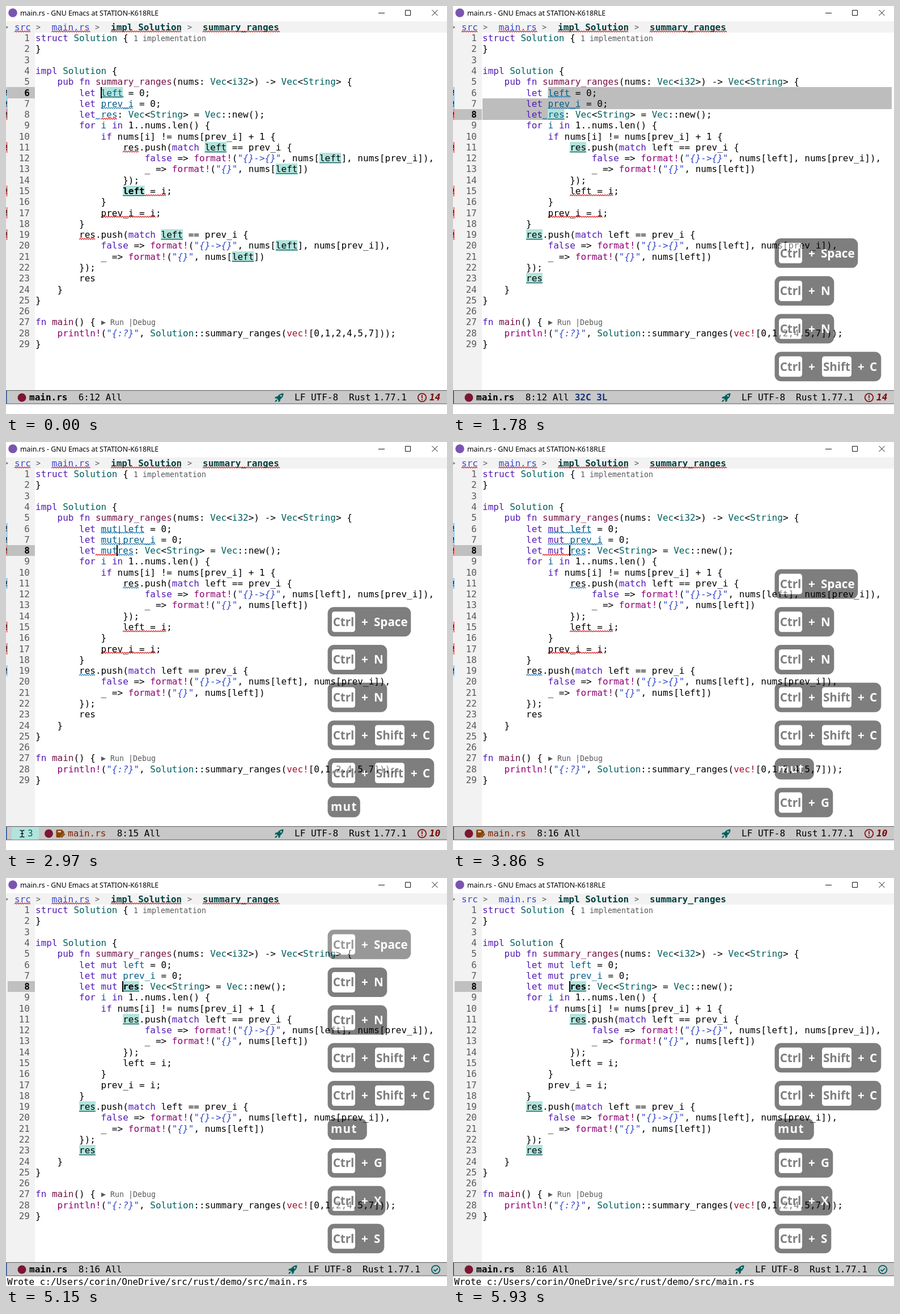
Animation, 778 px wide and 720 px high, one loop 6060 ms. Source, as an HTML page:

```html
<!DOCTYPE html>
<html lang="en">
<head>
<meta charset="utf-8">
<title>Editing with several cursors</title>
<style>
html, body { margin: 0; width: 100%; height: 100%; overflow: hidden; background: #fff; }
svg { display: block; width: 778px; height: 720px; }
text { font: 16px "DejaVu Sans Mono", monospace; white-space: pre; }
.b { font-weight: bold; }
.i { font-style: italic; }
.small { font-size: 13.3px; }
.title { font: 12.4px "Noto Sans", sans-serif; }
.cap { font: bold 20.6px "Noto Sans", sans-serif; fill: #fff; }
.dark { fill: #000; text-anchor: middle; }
.typed { letter-spacing: 1.4px; }
</style>
</head>
<body>
<svg id="stage" viewBox="0 0 778 720"></svg>
<script>
const LOOP = 6060, CW = 9.632, ROW = 19.28, TOP = 47, LEFT = 52;
const RED = '#d81e1e', BLUE = '#2a7fb8', TEAL = '#005f5f';
const NB = '\u00a0';
const stage = document.getElementById('stage');

const CODE = `struct Solution {
}

impl Solution {
    pub fn summary_ranges(nums: Vec<i32>) -> Vec<String> {
        let @left = 0;
        let @prev_i = 0;
        let #res: Vec<String> = Vec::new();
        for i in 1..nums.len() {
            if nums[i] != nums[prev_i] + 1 {
                res.push(match left == prev_i {
                    false => format!("{}->{}", nums[left], nums[prev_i]),
                    _ => format!("{}", nums[left])
                });
                left = i;
            }
            prev_i = i;
        }
        res.push(match left == prev_i {
            false => format!("{}->{}", nums[left], nums[prev_i]),
            _ => format!("{}", nums[left])
        });
        res
    }
}

fn main() {
    println!("{:?}", Solution::summary_ranges(vec![0,1,2,4,5,7]));
}`.split('\n');

const RULES = [
  ['bold', /\*\w+\*/, '#000'],
  ['str', /"[^"]*"/, '#3548cf'],
  ['fn', /(?<=fn )\w+/, '#721045'],
  ['var', /(?<=let mut )[\w\u00a0]+|(?<=let )(?!mut )[\w\u00a0]+|(?<=for )i/, '#005e8b'],
  ['key', /\b(?:struct|impl|pub|fn|let|mut|for|in|if|match|false)\b/, '#531ab6'],
  ['type', /\b(?:[A-Z]\w*|i32)\b/, TEAL],
  ['vec', /vec!/, '#a0132f'],
  ['mac', /\w+!(?=\()/, '#8f0075']
];
const TOKENS = new RegExp(RULES.map(([n, r]) => `(?<${n}>${r.source})`).join('|') + '|[^]', 'g');

const esc = s => s.replace(/&/g, '&amp;').replace(/</g, '&lt;').replace(/>/g, '&gt;');
const rect = (x, y, w, h, fill, more = '') =>
  `<rect x="${x}" y="${y}" width="${w}" height="${h}" fill="${fill}" ${more}/>`;
const text = (x, y, s, fill = '#000', cls = '', more = '') =>
  `<text x="${x}" y="${y}" fill="${fill}" class="${cls}" ${more}>${esc(s)}</text>`;
const path = (d, stroke, w = 1, fill = 'none') =>
  `<path d="${d}" stroke="${stroke}" stroke-width="${w}" fill="${fill}"/>`;
const disc = (x, y, r, fill) => `<circle cx="${x}" cy="${y}" r="${r}" fill="${fill}"/>`;
const wave = (x, y, w, c) => path(`M${x} ${y}` + 'l2 -2l2 2'.repeat(Math.round(w / 4)), c, 1.2);
const rowY = n => Math.round(TOP + (n - 1) * ROW);
const baseY = n => TOP + (n - 1) * ROW + 15.1;
const rowH = n => rowY(n + 1) - rowY(n);
const colX = c => LEFT + c * CW;
const during = (t, a, b) => t >= a && t < b;
// value of the last [time, value] step already reached
const at = (t, steps) => steps.reduce((v, [time, val]) => t >= time ? val : v, steps[0][1]);

function codeLine(s, n) {
  let out = '';
  for (const m of s.matchAll(TOKENS)) {
    const rule = RULES.find(([name]) => m.groups[name] !== undefined);
    const word = esc(m[0].replace(/\*/g, ''));
    if (!rule) { out += word; continue; }
    const cls = { bold: 'b', str: 'i' }[rule[0]] || '';
    out += `<tspan fill="${rule[2]}" class="${cls}">${word}</tspan>`;
  }
  return `<text x="${LEFT}" y="${baseY(n)}">${out}</text>`;
}

function frameBase() {
  const x = 757, y = 12;
  return rect(0, 0, 778, 720, '#fff') + disc(12, 12, 7.8, '#7a55b0') +
    text(25, 17, 'main.rs - GNU Emacs at STATION-K618RLE', '#000', 'title') +
    path(`M657 12.5h11M704.5 7.5h9v9h-9zM${x - 5.5} ${y - 5}l10 10m0 -10l-10 10`, '#111') +
    rect(0, 27, 778, 20, '#f2f2f2') + rect(0, 47, 51, 632, '#f2f2f2');
}

function breadcrumbs(wavy) {
  const parts = [[15, 'src', '#3548cf', ''], [80.5, 'main.rs', '#3548cf', ''],
    [185, 'impl Solution', '#00403f', 'b'], [347, 'summary_ranges', '#00403f', 'b']];
  return [-4, 53, 157, 320].map(x => text(x, 42, '>', '#595959', 'small')).join('') +
    parts.map(([x, s, c, cls]) => text(x, 42.5, s, c, cls) +
      (wavy ? wave(x, 46, s.length * CW, RED) : '')).join('');
}

function waves(edited, ins, gap) {
  const early = edited ? BLUE : RED;
  const list = [
    [6, 12, ins + gap + 4, BLUE], [7, 12, ins + gap + 6, BLUE],
    [8, 11, 1 + ins, edited ? RED : BLUE], [8, 12 + ins, 3, early],
    [11, 16, 3, early], [15, 16, 8, RED], [17, 12, 10, RED], [19, 8, 3, early]
  ];
  return list.map(([n, c, len, color]) => wave(colX(c), rowY(n) + 18, len * CW, color)).join('');
}

function fringe(edited) {
  return [6, 7, 8, 11, 15, 17, 19].map(n => {
    const blue = n < 8 || edited && (n === 11 || n === 19), y = rowY(n);
    return rect(0, y, 3, rowH(n), blue ? '#9fd3f5' : '#ff8f88') +
      rect(0, y + 5, 1.5, 6, '#222') + rect(0, y + 12.5, 1.5, 2, '#222');
  }).join('');
}

function rocket(x) {
  return `<g transform="translate(${x} 691)">` +
    path('M7.5 -7.5C2 -7.5 -1 -5 -3 -2L-6.5 -1.5L-8 1.5L-4.5 1.5L-1.5 4.5L-1.5 8L1.5 6.5L2 3C5 1 7.5 -2 7.5 -7.5Z', 'none', 0, TEAL) +
    path('M-4 3.5C-7 4 -7.5 6 -7.5 7.5C-6 7.5 -4 7 -3.5 4Z', 'none', 0, TEAL) +
    disc(3.2, -3.2, 1.6, '#c8c8c8') + '</g>';
}

function modeLine(t, s) {
  let x = 0;
  let out = rect(0, 678, 778, 24, '#c8c8c8') + rect(0, 678, 778, 1, '#5a5a5a') +
    rect(0, 701.5, 778, 1, '#5a5a5a') + rect(0, 679, 1.5, 23, '#1f4b94');
  if (s.multi) {
    out += rect(10, 679.5, 48, 22, '#b0e4dc') + text(38, 696, '3', TEAL) +
      path('M24.5 685.5h2.5l1.5 1.5l1.5 -1.5h2.5M28.5 687v8M24.5 697h2.5l1.5 -1.5l1.5 1.5h2.5M26 691h5', '#111', 1.4);
    x = 47.5;
  }
  out += disc(x + 28, 691, 7.5, '#7c1632');
  if (s.modified) {
    const e = x + 41;
    out += path(`M${e + 2} 684h8l4 4v2l-6 6v2h-6q-2 0 -2 -2v-10q0 -2 2 -2z`, 'none', 0, '#8a4500') +
      rect(e + 3, 686, 5.5, 3, '#c8c8c8') +
      path(`M${e + 9} 697.5l6 -6`, '#8a4500', 2.6);
    x += 20.5;
  }
  out += text(x + 41, 696, 'main.rs', s.modified ? '#7f2000' : '#000', s.modified ? '' : 'b');
  out += text(x + 127.7, 696, `${s.line}:${12 + s.ins.length} All`);
  if (s.region) {
    const info = at(t, [[0, '0C'], [710, '15C 2L'], [910, '32C 3L']]);
    out += text(x + 214.7, 696, info, '#12307f', 'b');
  }
  const r = s.saved ? 24 : 0;
  out += rocket(482 + r) + text(509 + r, 696, 'LF UTF-8') + text(605 + r, 696, 'Rust') +
    text(649 + r, 696, '1.77.1');
  if (s.saved) {
    out += path('M765.4 691a7.2 7.2 0 1 1 -14.4 0a7.2 7.2 0 1 1 14.4 0M754.5 691.2l2.6 2.6l4.8 -5', TEAL, 1.8);
  } else {
    out += path('M741.2 691a7.2 7.2 0 1 1 -14.4 0a7.2 7.2 0 1 1 14.4 0M734 686.5v5.5M734 693.5v2', '#8b0d0d', 1.8) +
      text(747, 696, s.edited ? '10' : '14', '#7f0000', 'b i');
  }
  return out;
}

// [time, last key, badge width, with shift]
const PRESSES = [
  [490, 'Space', 146], [710, 'N', 104], [910, 'N', 104], [1780, 'C', 187, true],
  [1910, 'C', 187, true], [2650, 'typed'], [3860, 'G', 102], [4730, 'X', 101], [4890, 'S', 99]
];
const TYPED = [[2650, 'm', 31.5], [2810, 'mu', 46], [2920, 'mut', 56.5], [3320, 'mut ', 68.5]];
const BADGE_GAP = 14.7;

function badge(t, [time, key, width, shift], bottom) {
  const typed = key === 'typed';
  const h = typed ? 37.4 : 52, y = bottom - h;
  const step = Math.floor((t - time - 4660) / 50);
  const alpha = step < 0 ? 0.5 : Math.max(0, 0.4 - step * 0.134);
  if (!alpha) return [h, ''];
  const cap = (x, s, cls = '') => text(568 + x, y + (typed ? 25.7 : 33.4), s, '#fff', 'cap ' + cls);
  const box = (x, w, s) => rect(568 + x, y + 8, w, 36, '#fff', 'rx="4.5"') +
    text(568 + x + w / 2, y + 33.4, s, '#000', 'cap dark');
  let body;
  if (typed) {
    const [, word, w] = at(t, TYPED.map(p => [p[0], p]));
    width = w;
    body = cap(5, word, 'typed');
  } else {
    body = box(7, 41, 'Ctrl') + cap(59, '+') +
      (shift ? box(83, 52, 'Shift') + cap(146, '+') + cap(167, key) : cap(81, key));
  }
  return [h, `<g opacity="${alpha}">${rect(567.5, y, width + 0.8, h, '#000', 'rx="11"')}${body}</g>`];
}

function badges(t) {
  let bottom = 662.2, out = '';
  for (const p of PRESSES.filter(p => t >= p[0]).reverse()) {
    const [h, s] = badge(t, p, bottom);
    out += s;
    bottom -= h + BADGE_GAP;
  }
  return out;
}

function picture(t) {
  const s = {
    line: at(t, [[0, 6], [710, 7], [910, 8]]),
    ins: at(t, [[0, ''], [2650, 'm'], [2810, 'mu'], [2970, 'mut'], [3370, 'mut ']]),
    region: during(t, 490, 1940),
    multi: during(t, 1940, 3860),
    edited: t >= 2650,
    modified: during(t, 2650, 4940),
    saved: t >= 4990
  };
  const hot = t < 490 ? 'left' : during(t, 1450, 1940) || t >= 4350 ? 'res' : '';
  const blank = [[30, 490], [1400, 1940], [2480, 2650], [4350, 4730], [5440, 5930]]
    .some(([a, b]) => during(t, a, b));
  const gap = s.multi ? 1 : 0, n = s.ins.length;
  const lines = CODE.map(l => l.replace('@', s.ins + (gap ? NB : '')).replace('#', s.ins));

  let out = frameBase() + breadcrumbs(t < 5200);

  const y = rowY(s.line);
  out += rect(3, y, 48, rowH(s.line), '#c0c0c0');
  if (!s.saved) out += fringe(s.edited);

  if (s.region) {
    for (let r = 6; r <= s.line; r++) {
      const a = r === 6 ? colX(12) : LEFT, b = r === s.line ? colX(12) : 774;
      if (b > a) out += rect(a, rowY(r), b - a, rowH(r), '#bdbdbd');
    }
  }
  if (!s.saved) out += waves(s.edited, n, gap);

  if (hot) {
    lines.forEach((l, i) => {
      for (const m of l.matchAll(new RegExp(`\\b${hot}\\b`, 'g'))) {
        const x = colX(m.index), w = hot.length * CW, ry = rowY(i + 1);
        out += rect(x, ry, w, rowH(i + 1), '#b0e4dc') + rect(x, ry + 17, w, 1, '#00404a');
      }
    });
    if (hot === 'left') lines[14] = lines[14].replace('left', '*left*');
    else if (t >= 4350) lines[7] = lines[7].replace('res', '*res*');
  }

  lines.forEach((l, i) => {
    const now = i + 1 === s.line;
    out += text(42, baseY(i + 1), String(i + 1), now ? '#000' : '#595959', now ? 'b' : '', 'text-anchor="end"') +
      codeLine(l, i + 1);
  });
  out += text(225, baseY(1), '1 implementation', '#595959', 'small');
  const ly = rowY(27);
  out += path(`M168 ${ly + 7}l8 4l-8 4z`, 'none', 0, '#595959') +
    text(184, baseY(27), 'Run |Debug', '#595959', 'small');

  if (gap) for (const r of [6, 7]) out += rect(colX(12 + n) + 3, rowY(r) + 5, 1.4, 14, '#1b5f86');
  if (!blank) out += rect(Math.round(colX(12 + n)) - 1, y, 2, rowH(s.line), '#000');

  out += modeLine(t, s);
  const echo = at(t, [[0, ''], [490, 'Mark set'], [710, ''],
    [4940, 'Wrote c:/Users/corin/OneDrive/src/rust/demo/src/main.rs']]);
  return out + text(2, 717.5, echo) + badges(t);
}

let shown = '';
function tick(now) {
  const next = picture(now % LOOP);
  if (next !== shown) stage.innerHTML = shown = next;
  requestAnimationFrame(tick);
}
tick(0);
</script>
</body>
</html>
```
